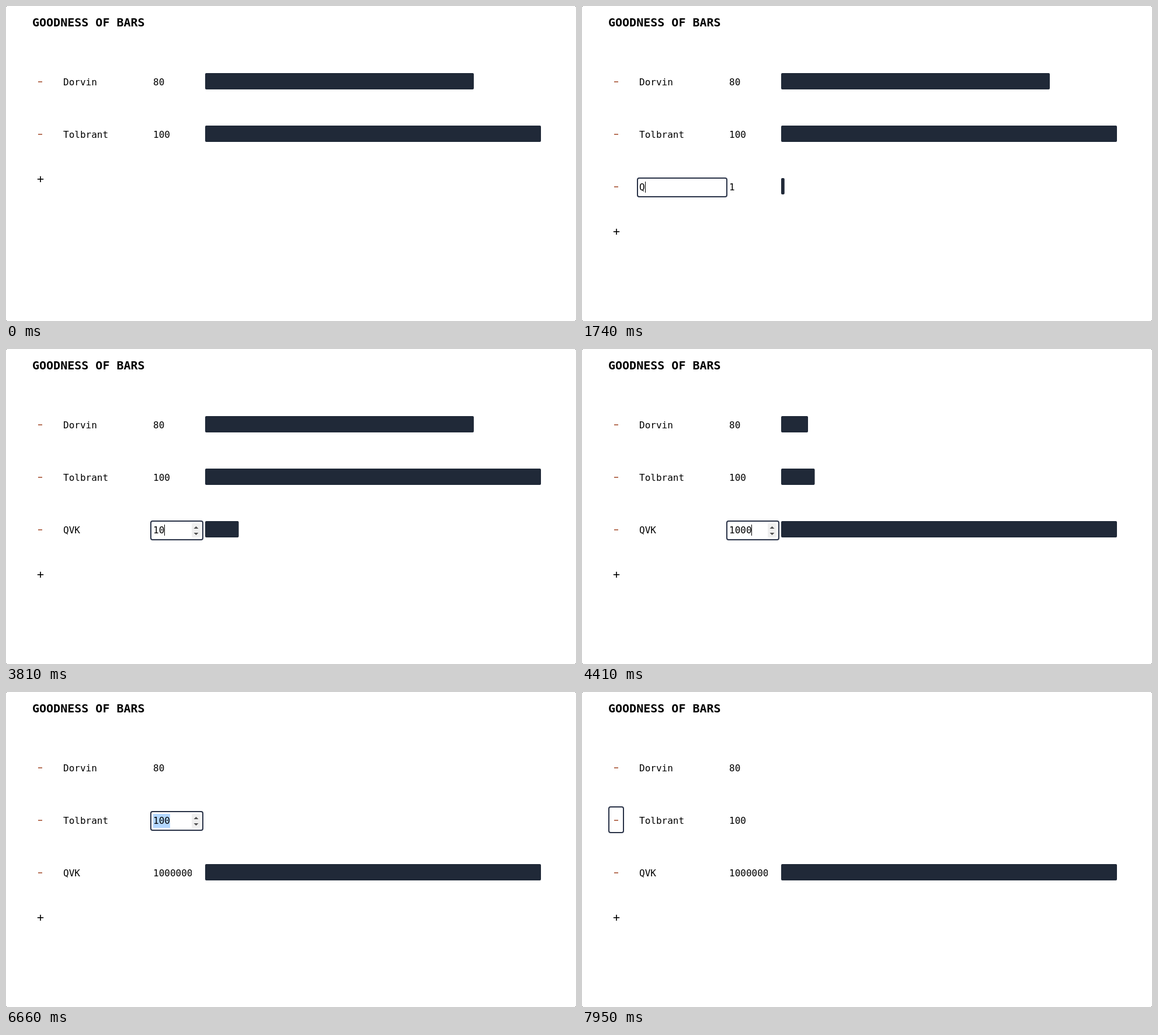
These frames come from a looping animation (976 by 540 pixels, 8 s). An HTML page with a canvas:

```html
<!DOCTYPE html>
<html lang="en">
<head>
<meta charset="utf-8">
<title>Goodness of bars</title>
<style>
  html, body { margin: 0; width: 100%; height: 100%; overflow: hidden; background: #fff; }
  canvas { display: block; }
</style>
</head>
<body>
<canvas id="stage" width="976" height="540"></canvas>
<script>
const ctx = document.getElementById('stage').getContext('2d');
const LOOP = 8000;
const MONO = '"DejaVu Sans Mono", "Liberation Mono", monospace';
const DARK = '#202938', RING = '#2a3348', BLUE = '#b3d7ff', RUST = '#b8735a';
const TOP = 115, STEP = 90, BAR_X = 341, BAR_W = 575;
const LABEL_X = 98, VALUE_X = 252, VALUE_W = 66;

// Each event changes part of the state: row = focused row, field = focused
// field, mark = 'caret', 'all' (selected) or '' (caret blinked off).
const events = [
  [0, { label: null, value: 0, row: -1, field: '', mark: '' }],
  [330, { label: 'label', value: 1, row: 2, field: 'label', mark: 'caret' }],
  [780, { mark: '' }],
  [840, { mark: 'all' }],
  [1740, { label: 'Q', mark: 'caret' }],
  [1800, { label: 'QV' }],
  [2160, { label: 'QVK' }],
  [2550, { field: 'value', mark: 'all' }],
  [2670, { mark: 'caret' }],
  [3090, { mark: '' }],
  [3450, { value: 10, mark: 'caret' }],
  [3840, { value: 100 }],
  [4290, { mark: '' }],
  [4410, { value: 1000, mark: 'caret' }],
  [4860, { mark: '' }],
  [5130, { value: 10000, mark: 'caret' }],
  [5520, { value: 100000 }],
  [5700, { value: 1000000 }],
  [6180, { mark: '' }],
  [6270, { field: 'label', mark: 'all' }],
  [6540, { field: 'remove' }],
  [6660, { row: 1, field: 'value' }],
  [6900, { row: 2, field: 'remove' }],
  [7680, { row: 1, field: 'value' }],
  [7830, { field: 'label' }],
  [7950, { field: 'remove' }]
];

function stateAt(time) {
  return Object.assign({}, ...events.filter(e => e[0] <= time).map(e => e[1]));
}

function rect(x, y, w, h, color) {
  ctx.fillStyle = color;
  ctx.fillRect(x, y, w, h);
}

function text(str, x, y, font = '16px') {
  ctx.font = font + ' ' + MONO;
  ctx.fillStyle = '#000';
  ctx.fillText(str, x, y);
}

function rounded(x, y, w, h, r) {
  ctx.beginPath();
  ctx.roundRect(x, y, w, h, r);
}

function ring(x, y, w, h) {
  rounded(x + 1, y + 1, w - 2, h - 2, 3);
  ctx.strokeStyle = RING;
  ctx.lineWidth = 2;
  ctx.stroke();
}

function arrow(y, dir) {
  ctx.beginPath();
  ctx.moveTo(321.5, y);
  ctx.lineTo(329.5, y);
  ctx.lineTo(325.5, y - 4 * dir);
  ctx.fillStyle = '#505050';
  ctx.fill();
}

function spinner(y) {
  rounded(318, y + 4, 15, 24, 2);
  ctx.fillStyle = '#efefef';
  ctx.fill();
  arrow(y + 13, 1);
  arrow(y + 20, -1);
}

function input(str, x, width, y, mark) {
  ctx.font = '16px ' + MONO;
  const w = ctx.measureText(str).width;
  const shift = mark === null ? 0 : Math.max(0, w + 1 - width);
  ctx.save();
  ctx.beginPath();
  ctx.rect(x, y, width, 34);
  ctx.clip();
  if (mark === 'all') rect(x, y + 4, Math.round(w), 24, BLUE);
  text(str, x - shift, y + 21);
  if (mark === 'caret') rect(Math.floor(x + w - shift + (x === LABEL_X ? 0.9 : 0)), y + 6, 1, 19, '#000');
  ctx.restore();
}

function drawRow(item, i, max, state) {
  const y = TOP + i * STEP;
  const focus = state.row === i ? state.field : '';
  const markFor = field => focus === field ? state.mark : null;

  rect(55, y + 14, 7, 2, RUST);
  if (focus === 'remove') ring(45, y - 9, 27, 46);
  if (focus === 'label') ring(94, y - 1, 155, 34);
  if (focus === 'value') {
    ring(247, y - 1, 91, 34);
    spinner(y);
  }
  input(item.label, LABEL_X, 146, y, markFor('label'));
  input(String(item.value), VALUE_X, VALUE_W, y, markFor('value'));

  const w = BAR_W * item.value / max;
  if (w < 0.2) return;
  rounded(BAR_X, y, w, 28, Math.min(2, w / 2));
  ctx.fillStyle = DARK;
  ctx.fill();
}

function draw(time) {
  const state = stateAt(time);
  const rows = [{ label: 'Dorvin', value: 80 }, { label: 'Tolbrant', value: 100 }];
  if (state.label) rows.push({ label: state.label, value: state.value });
  const max = Math.max(...rows.map(r => r.value));

  rect(0, 0, 976, 540, '#fff');
  for (const x of [0, 975]) for (const y of [0, 539]) rect(x, y, 1, 1, '#555');
  text('GOODNESS OF BARS', 45, 35, 'bold 20px');
  rows.forEach((item, i) => drawRow(item, i, max, state));
  text('+', 53, 123 + rows.length * STEP, '20px');
}

const start = performance.now();
function tick() {
  draw((performance.now() - start) % LOOP);
  requestAnimationFrame(tick);
}
tick();
</script>
</body>
</html>
```
